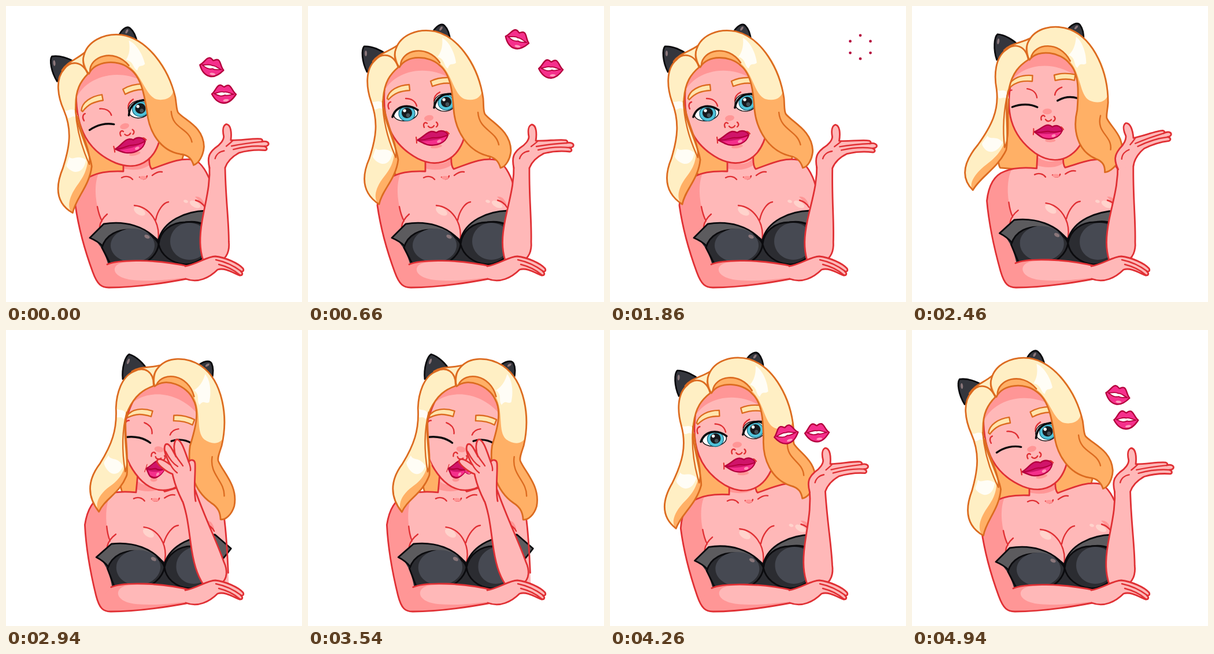
Write an HTML page that moves like this. It is 512 px wide and 512 px high and loops after 5.02 s.

```html
<!DOCTYPE html>
<html lang="en">
<head>
<meta charset="utf-8">
<title>Blowing kisses</title>
<style>
html, body { margin: 0; width: 100%; height: 100%; overflow: hidden; background: #fff; }
svg { display: block; width: 100%; height: 100%; }
</style>
</head>
<body>
<svg id="stage" viewBox="0 0 512 512" stroke-linecap="round" stroke-linejoin="round"></svg>
<script>
const SKIN = '#ffb8b8', BLUSH = '#ff9696', RED = '#e03034';
const CREAM = '#ffefc4', AMBER = '#ffb066', RUST = '#dc6b20';
const BLACK = '#0b0b0e', COAL = '#2b2c31', SLATE = '#464952', TRIM = '#5c5b5e';
const ROSE = '#f5308c', PLUM = '#d0146a', WINE = '#b4003c';
const stage = document.getElementById('stage');

function make(tag, parent, attrs = {}) {
  const el = document.createElementNS('http://www.w3.org/2000/svg', tag);
  for (const name in attrs) el.setAttribute(name, attrs[name]);
  return parent.appendChild(el);
}
const group = parent => make('g', parent);
const place = (el, transform) => el.setAttribute('transform', transform);
const show = (el, on) => el.setAttribute('visibility', on ? 'inherit' : 'hidden');

// Parts with a bend function are re-plotted on every tick.
const bent = [];
function add(parent, d, fill = 'none', stroke = 'none', width = 2.8, bend) {
  const el = make('path', parent, { d, fill, stroke, 'stroke-width': width });
  if (bend) bent.push({ el, d, bend });
  return el;
}
function oval(cx, cy, rx, ry, tilt = 0) {
  const a = tilt * Math.PI / 180, k = 0.5523;
  const at = (u, v) => {
    const x = u * rx, y = v * ry;
    return `${(cx + x * Math.cos(a) - y * Math.sin(a)).toFixed(1)} ${(cy + x * Math.sin(a) + y * Math.cos(a)).toFixed(1)}`;
  };
  return `M${at(1, 0)} C${at(1, k)} ${at(k, 1)} ${at(0, 1)} C${at(-k, 1)} ${at(-1, k)} ${at(-1, 0)}` +
    ` C${at(-1, -k)} ${at(-k, -1)} ${at(0, -1)} C${at(k, -1)} ${at(1, -k)} ${at(1, 0)}Z`;
}

let pose = {};
const sway = (x, y) => [x + pose.sway * Math.max(0, y - 180) / 160, y];
const lean = (x, y) => [
  x + pose.lean * (520 - y) / 224,
  y - Math.min(8, pose.lean * 0.67) * Math.max(0, Math.min(1, (300 - x) / 150)) * Math.max(0, Math.min(1, (470 - y) / 70))
];

// Hair behind the shoulders
const backHair = group(stage);
add(backHair, 'M138 140 L146 262 C146 282 150 292 156 298 L290 290 C305 285 312 275 315 262 L285 140Z', AMBER, RUST, 2.8, sway);

// Torso
const torso = group(stage);
const body = (d, fill, stroke, width) => add(torso, d, fill, stroke, width, lean);
const outline = 'M203 255 L203 286 C180 285 162 287 148 294 C126 302 121 328 120 345 C125 380 136 422 150 460 C158 482 165 487 178 487 C220 487 270 480 312 472';
const shoulder = 'C372 400 366 350 356 312 C350 290 338 270 325 266 C300 262 280 272 252 282 C248 278 247 270 248 255';
body(`${outline} L378 440 ${shoulder}Z`, SKIN);
body('M160 290 C152 308 154 340 163 362 C162 395 168 425 178 448 L160 480 C135 430 125 380 120 345 C121 325 126 298 160 290Z', BLUSH);
body('M203 266 C215 276 240 276 248 262 L249 274 C238 284 218 285 203 281Z', BLUSH);
body('M327 330 C335 328 342 335 344 346Z', BLUSH);
body('M158 347 C160 358 163 366 166 372 M175 360 C168 366 163 374 162 382', 'none', RED, 2.4);
body('M222 345 C246 347 268 372 263 406 M259 370 C262 354 272 340 281 339', 'none', RED, 2.4);
body('M328 336 C336 338 341 343 344 348', 'none', RED, 2.4);
body('M200 297 C207 293 215 295 219 300 M253 293 C258 289 264 286 270 287 M231 296 C236 301 242 300 244 294', 'none', RED, 2.4);
body(oval(237, 297, 6, 3), BLUSH);
body(oval(231, 355, 11, 6, 32), '#ffd3cc');
body(oval(327, 343, 10, 5, 28), '#ffd3cc');
body(oval(311, 338, 4, 2.5, 15), '#ffd3cc');

body('M150 402 C164 412 172 430 177 448 L330 450 L364 394 C330 365 285 372 264 404 C230 375 190 375 150 402Z', COAL);
body('M145 401 L169 377 C205 371 242 380 264 408 C236 380 188 382 167 415 C160 408 152 404 145 401Z', TRIM, BLACK);
body('M264 404 C272 372 310 355 346 354 L376 378 C372 384 368 390 364 395 C340 360 285 370 264 404Z', TRIM, BLACK);
body('M166 418 C172 395 195 386 215 387 C240 389 260 400 264 412 C262 430 245 446 225 449 L182 449Z', COAL, BLACK);
body('M264 412 C266 390 285 374 310 374 C335 372 352 380 360 395 C360 430 330 447 310 447 C285 445 268 430 264 412Z', COAL, BLACK);
body(oval(219, 414, 38, 29), SLATE);
body(oval(317, 407, 33, 32), SLATE);
body(oval(244, 399, 5, 3, 25), '#8b777b');

body('M176 447 C195 438 260 438 316 450 L312 472 C270 480 220 487 178 487 C165 487 158 480 154 468Z', BLUSH);
body('M202 444 C180 448 182 470 220 474 C260 478 300 470 314 470 L316 450 C270 441 225 440 202 444Z', SKIN);
body('M175 447 C195 438 260 438 314 450', 'none', RED);
body(outline, 'none', RED);
body('M375 420 ' + shoulder, 'none', RED);

// Head
const head = group(stage);
const hair = (d, fill, stroke, width) => add(head, d, fill, stroke, width, sway);
add(head, 'M102 114 C93 96 92 76 97 70 C110 69 126 76 136 84Z', '#34363d', BLACK);
add(head, 'M214 48 C221 34 231 29 236 34 C243 41 245 50 246 60Z', '#34363d', BLACK);
add(head, oval(100, 82, 2, 5), '#8b777b');
add(head, oval(230, 39, 2, 4, 35), '#8b777b');
add(head, 'M112 96 C122 82 138 80 155 68 L165 110Z', CREAM, RUST);
add(head, 'M133 135 C126 200 145 240 190 264 C208 273 228 275 245 264 C264 252 275 225 277 190 L262 110 C230 75 180 85 150 110Z', SKIN, RED);
add(head, 'M131 150 C142 120 195 95 248 126 L235 95 C200 75 150 95 131 128Z', BLUSH);

const face = group(head);
add(face, 'M137 160 C139 146 156 137 175 136 L176 146 C160 147 150 150 139 162Z', '#ffe5ad', RUST, 2.4);
add(face, 'M212 130 C222 125 235 123 248 124 L248 134 C235 132 225 135 215 139Z', '#ffe5ad', RUST, 2.4);
add(face, 'M169 160 C179 160 186 165 188 173 M218 164 C218 156 222 152 228 149 M140 178 C137 172 139 167 143 166', 'none', RED, 2.4);
add(face, oval(209, 194, 8, 5, -10), BLUSH);
add(face, 'M201 210 C198 203 203 200 206 203 M208 208 C212 213 217 209 218 207 M222 201 C226 204 224 208 222 209', 'none', RED, 2.4);

function eye(cx, cy, rx, ry, lash, shut) {
  const open = group(face);
  add(open, oval(cx, cy, rx, ry, -8), '#fff', BLACK, 1.4);
  add(open, oval(cx + 2, cy, 14, 13), '#50c3da', '#14607a', 1.2);
  add(open, oval(cx + 2, cy - 1, 9, 9), '#17191d');
  add(open, oval(cx + 4, cy + 3, 3.5, 3.5), '#46545c');
  add(open, oval(cx - 2, cy - 5, 2.8, 2.8), '#fff');
  add(open, lash, 'none', BLACK, 3.6);
  const closed = add(face, shut, 'none', BLACK, 3.4);
  return amount => {
    show(open, amount > 0.25);
    show(closed, amount <= 0.25);
    place(open, `translate(0 ${cy}) scale(1 ${Math.max(amount, 0.1)}) translate(0 ${-cy})`);
  };
}
const leftEye = eye(169, 186, 21, 12.5, 'M146 192 C152 173 172 168 190 180', 'M148 195 C162 187 178 185 191 189');
const rightEye = eye(237, 167, 19, 15, 'M218 176 C221 157 236 149 256 153', 'M224 173 C234 165 246 162 258 164');

const mouth = group(face);
add(mouth, oval(222, 243, 10, 3, -8), BLUSH);
add(mouth, 'M189 232 C200 227 206 217 214 217 C218 217 220 218 222 219 C230 213 240 217 242 223 C238 237 222 243 207 240 C199 238 194 234 189 232Z', PLUM, WINE, 2.4);
add(mouth, 'M197 234 C210 234 225 232 240 225 C237 236 222 241 207 239Z', ROSE);
add(mouth, 'M190 232 C205 233 212 226 220 228 C228 228 236 226 242 223', 'none', WINE, 2);
add(mouth, oval(227, 234, 4, 2.5, -20), '#ff8fb4');
add(mouth, 'M187 227 C188 231 188 234 188 237 M239 217 C242 218 243 220 244 221', 'none', RED, 2.2);

// Front hair
const rightLock = 'M158 106 C150 96 148 84 152 74 C160 50 190 38 220 44 C265 55 296 110 303 160 C304 175 303 182 306 187 C318 202 350 215 351 250 C350 265 342 278 333 280 C330 270 325 262 310 259 C275 250 255 215 252 180 C250 150 247 118 228 103 C210 85 170 84 158 106Z';
hair(rightLock, AMBER);
hair('M158 106 C150 84 150 78 156 68 C170 45 195 40 220 44 C265 55 296 105 301 145 C300 160 286 165 271 161 C252 154 250 118 228 99 C210 72 168 66 158 106Z', CREAM);
hair('M232 55 C245 62 254 82 256 98 C250 104 246 96 242 108 C234 104 238 92 224 88 C232 78 233 66 232 55Z', '#fffdf6');
hair('M160 102 C162 76 205 65 228 98', 'none', RUST, 2.6);
hair('M294 184 C296 215 325 215 330 240', 'none', RUST, 2.4);
hair(rightLock, 'none', RUST);
const leftLock = 'M156 106 C148 82 128 80 116 94 C98 110 101 142 109 165 C122 200 118 228 106 264 C92 296 94 324 123 343 C128 318 152 300 156 266 C152 235 126 190 130 160 C132 132 142 118 156 106Z';
hair(leftLock, CREAM);
hair('M156 248 C158 300 130 310 123 343 C114 336 114 320 128 300 C142 282 150 272 150 240Z', AMBER);
hair('M117 246 C123 254 132 242 146 254 C144 266 138 274 128 273 C121 272 112 264 112 260Z', '#fffdf6');
hair('M109 164 C115 170 120 160 129 168 C130 174 130 178 127 178 C122 174 118 182 114 178Z', '#fffdf6');
hair('M129 165 C130 205 142 240 152 262 C155 240 140 215 132 178', CREAM, RUST, 2.4);
hair(leftLock, 'none', RUST);

// Flying kisses and their bursts
function kiss(keys, endTime) {
  const lips = group(stage);
  add(lips, 'M-21 1 C-15 -4 -13 -15 -7 -15 C-3 -15 -2 -12 0 -12 C2 -13 4 -16 8 -15 C13 -13 15 -4 21 0 C15 10 8 16 0 16 C-10 16 -17 8 -21 1Z', ROSE, WINE, 2.4);
  add(lips, 'M-17 0 C-10 -1 -6 -5 0 -3 C5 -5 10 -1 17 0 C10 1 7 4 2 2 C-4 5 -9 4 -17 0Z', '#fff', WINE, 1.8);
  add(lips, oval(4, 11, 5, 2, -8), '#ff9dbd');
  const dots = Array.from({ length: 6 }, () => make('circle', stage, { fill: WINE }));
  const [, cx, cy] = keys[keys.length - 1];
  return time => {
    const [x, y, turn, size] = sample(keys, time);
    show(lips, time >= keys[0][0] && time < endTime);
    place(lips, `translate(${x} ${y}) rotate(${turn}) scale(${size})`);
    const p = (time - endTime) / 600, reach = 50 * (1 - (1 - p) ** 2);
    dots.forEach((dot, i) => {
      const a = (i * 60 + 30) * Math.PI / 180;
      show(dot, p >= 0 && p < 1);
      dot.setAttribute('cx', cx + reach * Math.cos(a));
      dot.setAttribute('cy', cy + reach * Math.sin(a));
      dot.setAttribute('r', Math.max(0, 2.7 - 1.6 * p));
    });
  };
}
// time, x, y, turn, size
const kisses = [
  kiss([[3470, 268, 243, 0, 0.2], [3540, 279, 243, 5, 0.4], [4260, 358, 178, -1, 1], [4940, 356, 112, 14, 1],
    [5000, 356, 106, 14, 1], [5660, 362, 58, 18, 1], [6070, 364, 56, 18, 1]], 6070),
  kiss([[3900, 265, 235, -20, 0.2], [4260, 304, 181, -11, 1], [4940, 371, 155, 2, 1],
    [5000, 377, 152, 2, 1], [5660, 420, 109, 4, 1], [6730, 433, 71, 6, 1]], 6730)
];

// Raised arm with two hand poses
const arm = group(stage);
add(arm, 'M356 272 C357 310 348 335 341 370 C335 400 335 420 341 440 L365 442 C384 440 387 420 386 408 C387 370 382 330 383 274', SKIN, RED);
const openHand = group(arm);
add(openHand, 'M356 280 C352 262 356 254 366 246 C376 240 382 232 382 226 C380 216 381 207 387 205 C395 206 396 220 394 233 C410 234 435 230 446 232 C450 234 449 236 447 237 C455 235 460 238 459 242 C458 244 455 245 452 245 C457 247 457 251 453 252 C435 250 420 252 408 255 C396 261 387 270 383 280', SKIN, RED);
add(openHand, 'M386 243 C390 240 394 237 397 234 M395 243 C412 240 430 238 447 237 M398 249 C415 245 435 243 452 245 M366 264 C368 257 374 252 382 251', 'none', RED, 2.4);
const faceHand = group(arm);
place(faceHand, 'rotate(20.5 362 430)');
add(faceHand, 'M305 296 C298 282 291 264 288 249 C278 246 262 233 261 227 C263 220 272 224 284 233 C277 220 271 204 276 198 C282 194 288 207 294 219 C289 207 290 191 296 189 C304 192 308 206 316 228 C319 224 326 223 327 231 C328 250 324 275 328 296', SKIN, RED);
add(faceHand, 'M284 232 C288 240 292 244 296 247 M276 210 C282 222 290 232 297 236 M294 218 C299 226 303 230 306 235 M316 228 C318 234 320 238 319 243', 'none', RED, 2.4);

const restHand = group(stage);
add(restHand, 'M310 450 C330 447 348 433 362 433 C380 435 402 445 410 454 C412 458 410 460 406 459 C410 462 410 466 404 466 C392 461 378 452 366 456 C352 470 332 480 311 472', SKIN, RED);
add(restHand, 'M363 439 C378 442 395 450 407 459 M368 447 C380 450 394 456 404 465', 'none', RED, 2.4);

// Smooth curve through the keys that never overshoots them.
function sample(keys, time) {
  const last = keys.length - 1;
  if (time <= keys[0][0]) return keys[0].slice(1);
  if (time >= keys[last][0]) return keys[last].slice(1);
  const i = keys.findIndex(key => key[0] > time) - 1;
  const span = keys[i + 1][0] - keys[i][0], u = (time - keys[i][0]) / span;
  return keys[i].slice(1).map((from, c) => {
    const slope = j => (keys[j + 1][c + 1] - keys[j][c + 1]) / (keys[j + 1][0] - keys[j][0]);
    const tangent = j => {
      const a = slope(Math.max(0, j - 1)), b = slope(Math.min(last - 1, j));
      return a * b > 0 ? 2 * a * b / (a + b) : 0;
    };
    const to = keys[i + 1][c + 1], v = 1 - u;
    return from * v * v * (1 + 2 * u) + to * u * u * (3 - 2 * u) + span * u * v * (tangent(i) * v - tangent(i + 1) * u);
  });
}

// time, tilt, chin x, chin y, face x, face y, sway, lean, arm, hand
const moves = [
  [0, -5.3, 218.5, 276, 2, 8, -15, 0, -1.5, 0],
  [230, -7.5, 216, 277, 3, 9, -14, 0, -1, 0],
  [660, 0, 218, 271, 0, 0, 0, 0, 0, 0],
  [1200, 0.8, 218, 270, 0, 0, -4, 0, 0.5, 0],
  [1860, 0, 216, 271, 0, 0, 4, 0, 0.7, 0],
  [2200, 4, 227, 267, -4, -2, -42, 6, 0.5, -7],
  [2460, 8, 239, 265, -8, -4, -30, 12, 0, -13],
  [2880, 21, 254, 273, -5, 11, 22, 21, -20.5, -20],
  [3540, 21, 254, 273, -5, 11, 24, 21, -20.5, -20],
  [3900, 8, 234, 259, -4, 0, -32, 9, -3, -10],
  [4260, 3, 227, 277, -2, -1, -14, 3, -4, 1],
  [4940, -5, 220, 275, 2, 7, -8, 0, -2, 0],
  [5000, -5.3, 218.5, 276, 2, 8, -15, 0, -1.5, 0]
];
// time, left eye, right eye, mouth width, mouth height
const looks = [
  [0, 0, 1, 1, 1], [430, 0, 1, 1, 1], [570, 1, 1, 1, 1], [2270, 1, 1, 1, 1], [2400, 0, 0, 0.9, 1],
  [2600, 0, 0, 0.9, 1], [2900, 0, 0, 0.58, 1.25], [3650, 0, 0, 0.58, 1.25], [3860, 0, 0, 0.9, 1],
  [4000, 1, 1, 0.95, 1], [4560, 1, 1, 1, 1], [4700, 0, 1, 1, 1]
];

function draw(time) {
  const [tilt, x, y, faceX, faceY, swing, bow, armTurn, handTurn] = sample(moves, time);
  pose = { sway: swing, lean: bow };
  for (const { el, d, bend } of bent) {
    el.setAttribute('d', d.replace(/(-?[\d.]+) (-?[\d.]+)/g,
      (_, px, py) => bend(+px, +py).map(n => n.toFixed(2)).join(' ')));
  }
  const headPlace = `translate(${x} ${y}) rotate(${tilt}) translate(-218 -271)`;
  place(head, headPlace);
  place(backHair, headPlace);
  place(face, `translate(${faceX} ${faceY})`);

  const [left, right, wide, tall] = sample(looks, time);
  leftEye(left);
  rightEye(right);
  place(mouth, `translate(216 230) scale(${wide} ${tall}) translate(-216 -230)`);

  place(arm, `rotate(${armTurn} 362 430)`);
  place(openHand, `rotate(${handTurn} 368 278)`);
  show(openHand, armTurn > -13);
  show(faceHand, armTurn <= -13);
  for (const fly of kisses) fly(time < 2400 ? time + 5000 : time);
}

// Fifteen poses per second, 75 in the loop
function tick() {
  const ms = performance.now() % 5020;
  draw(Math.min(74, Math.floor((ms + 7) * 0.015)) / 0.015);
  requestAnimationFrame(tick);
}
tick();
</script>
</body>
</html>
```
